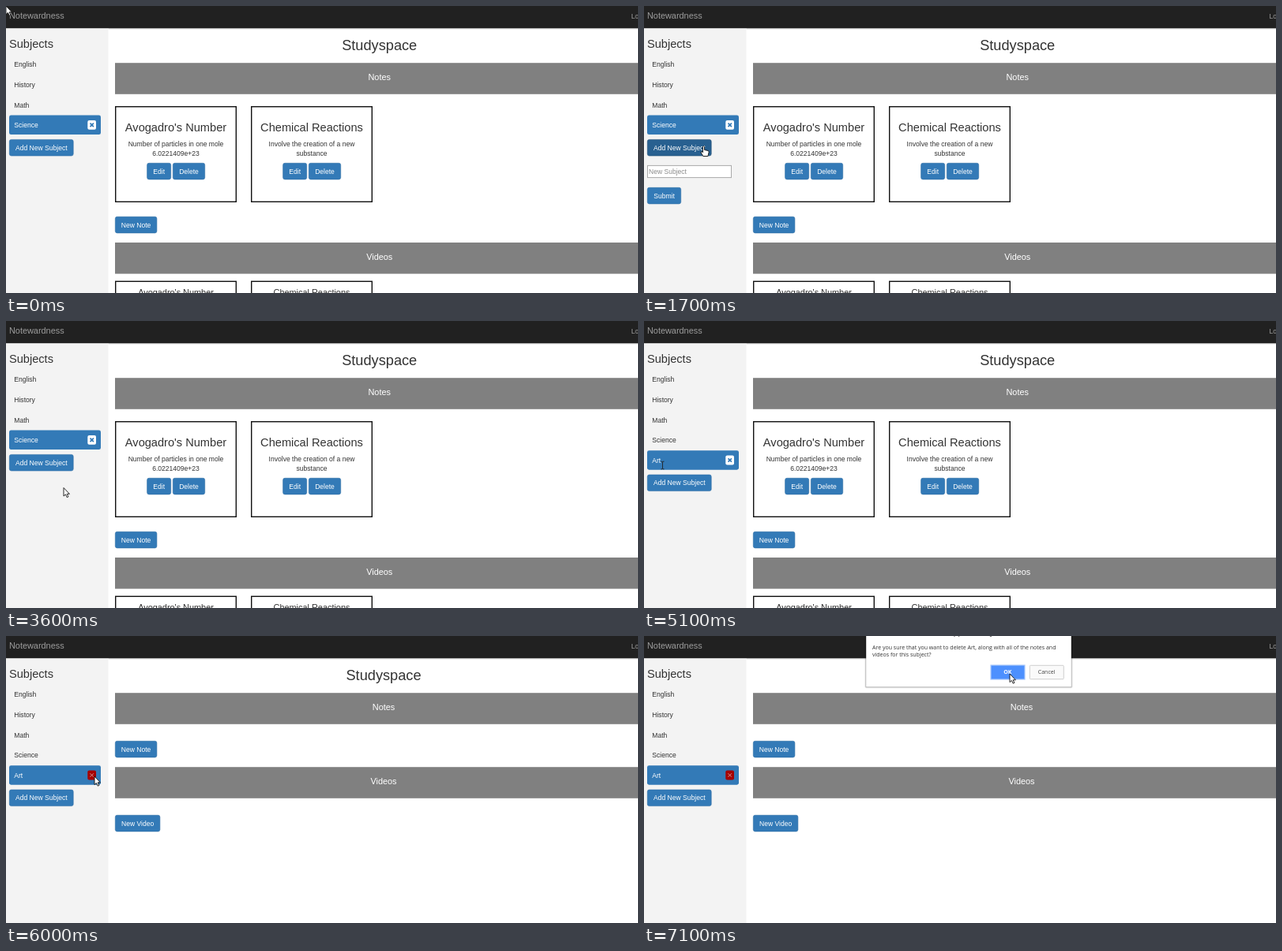
Animation, 800 px wide and 364 px high, one loop 7.2 s. Source, as an HTML page:

```html
<!DOCTYPE html>
<html lang="en">
<head>
<meta charset="utf-8">
<title>Studyspace</title>
<style>
html, body { margin: 0; width: 100%; height: 100%; overflow: hidden; background: #fff; }
svg { display: block; width: 100%; height: 100%; font: 8.55px "Liberation Sans", Arial, sans-serif; }
.dialog { font: 7.03px "Open Sans", "Noto Sans", sans-serif; }
</style>
</head>
<body>
<svg id="stage" viewBox="0 0 800 364"></svg>
<script>
const LOOP = 7200, STEP = 100, ROW = 25.6;
const stage = document.getElementById('stage');

// Pointer hot spot: time, x, y
const path = [
  [0, 0, 0], [800, 75.5, 177.5], [1700, 75.5, 177.5], [2300, 79, 218],
  [2800, 79, 218], [3000, 73, 211.5], [4400, 73, 211.5], [4900, 23.5, 183],
  [5200, 23.5, 183], [5800, 112, 178], [6200, 112, 178], [7000, 463, 48], [LOOP, 463, 48]
];

function pointerAt(t) {
  const i = path.findIndex(p => p[0] > t);
  const [t0, x0, y0] = path[i - 1], [t1, x1, y1] = path[i];
  const u = (t - t0) / (t1 - t0), e = u * u * (3 - 2 * u);
  return [x0 + (x1 - x0) * e, y0 + (y1 - y0) * e];
}

const rect = (x, y, w, h, fill, more = '') =>
  `<rect x="${x}" y="${y}" width="${w}" height="${h}" fill="${fill}" ${more}/>`;
const text = (s, x, y, fill = '#333', size = 8.55, more = '') =>
  `<text x="${x}" y="${y}" fill="${fill}" font-size="${size}" ${more}>${s}</text>`;
const mid = (s, x, y, fill, size, more = '') =>
  text(s, x, y, fill, size, 'text-anchor="middle" ' + more);
const button = (s, x, y, w, hover) =>
  rect(x + .3, y + .3, w - .6, 20.6, hover ? '#286090' : '#337ab7',
    `rx="2.4" stroke="${hover ? '#204d74' : '#2e6da4'}" stroke-width=".6"`) +
  mid(s, x + w / 2, y + 13.6, '#fff');
const bar = (s, x, y) => rect(138, y, 662, 39.6, '#808080') + mid(s, x, y + 21.5, '#fff', 10.9);
const frame = (x, y) =>
  rect(x + .7, y + .7, 152.6, 120.6, '#fff', 'stroke="#111" stroke-width="1.4"');

function note(x, title, line1, line2) {
  const c = x + 77;
  return frame(x, 127) + mid(title, c, 159.2, '#333', 14.6) +
    mid(line1, c, 177.6) + mid(line2, c, 189.8) +
    button('Edit', x + 40.3, 199, 30.7) + button('Delete', x + 73, 199, 41) +
    frame(x, 348.6) + mid(title, c, 367.3, '#333', 10.9);
}

function sidebar(t, hover) {
  const added = t >= 4000, red = t >= 5700;
  const names = ['English', 'History', 'Math', 'Science'];
  if (added) names.push('Art');
  const last = names.length - 1, y = 61.8 + last * ROW;
  let s = rect(0, 28, 129.5, 336, '#f3f3f3') + text('Subjects', 4, 53, '#333', 14.6);
  s += rect(4, y, 116, 24.5, '#337ab7', 'rx="2.4"');
  names.forEach((n, i) => s += text(n, 10.3, 77.4 + i * ROW, i === last ? '#fff' : '#333'));
  s += rect(103.3, y + 6.4, 10.7, 11.8, red ? '#a50000' : '#fff', 'rx="2"');
  s += `<path d="M106.5 ${y + 10.1}l4.4 4.4m0-4.4l-4.4 4.4" stroke="${red ? '#d59a9a' : '#337ab7'}" stroke-width="${red ? 1 : 1.7}"/>`;
  return s + button('Add New Subject', 4, y + 30.5, 81.5, hover);
}

function form(t) {
  const typed = 'Art'.slice(0, t < 2800 ? 0 : t < 3000 ? 1 : t < 3200 ? 2 : 3);
  const focus = t >= 2200;
  const caret = 6.2 + [0, 5.7, 8.6, 11][typed.length];
  return rect(4.5, 202.4, 106, 15.2, '#fff', `stroke="${focus ? '#5b9bea' : '#aaa'}"`) +
    text(typed || 'New Subject', 6, 213.2, typed ? '#333' : '#8c8c8c') +
    (focus ? rect(caret - .4, 205, .8, 10, '#222') : '') +
    button('Submit', 4, 230, 43);
}

function content(t) {
  const empty = t >= 5200, c = empty ? 478 : 472.7;
  const s = mid('Studyspace', c, 56.4, '#333', 18.2) + bar('Notes', c, 72.2);
  if (empty) return s + button('New Note', 138, 133, 53.2) + bar('Videos', c, 166.2) +
    button('New Video', 138, 227, 57.2);
  return s + note(138, "Avogadro's Number", 'Number of particles in one mole', '6.0221409e+23') +
    note(310, 'Chemical Reactions', 'Involve the creation of a new', 'substance') +
    button('New Note', 138, 267, 53.2) + bar('Videos', c, 300);
}

function dialog() {
  return '<g class="dialog">' +
    rect(279.5, -5, 263, 71.3, '#000', 'opacity=".1" rx="2"') +
    rect(280.5, -5, 261, 70.2, '#000', 'opacity=".25" rx="1"') +
    rect(281.2, -5, 259.6, 69.4, '#fff') +
    text('notewardness.herokuapp.com says:', 289, -1, '#222', 9.6) +
    text('Are you sure that you want to delete Art, along with all of the notes and', 289, 16.5, '#333', 7.03) +
    text('videos for this subject?', 289, 26, '#333', 7.03) +
    rect(439, 37, 43, 18, '#4d90fe', 'stroke="#a9c8fb" stroke-width="1.2"') +
    mid('OK', 460.3, 48.4, '#fff', 7.03, 'font-weight="700"') +
    rect(488.3, 37.3, 43, 17.4, '#fafafa', 'stroke="#c4c4c4" stroke-width=".8" rx="1"') +
    mid('Cancel', 509.6, 48.4, '#444', 7.03) + '</g>';
}

const cursors = {
  arrow: '<path d="M0 0V10.6L2.4 8.4L4.2 12.2L5.9 11.4L4.2 7.8H7.4Z" fill="#fff" stroke="#111" stroke-width=".9"/>',
  hand: '<path d="M-1 .8Q0-.6 1 .8V5L5.6 6Q6.8 6.3 6.6 8L5.4 13H-.6L-3.4 8.4Q-3.6 7-2.2 7.2L-1 8.3Z" fill="#fff" stroke="#111" stroke-width=".9"/>',
  beam: '<path d="M-2-4.8H-.5L0-4.3L.5-4.8H2M0-4.3V4.3M-2 4.8H-.5L0 4.3L.5 4.8H2" fill="none" stroke="#222" stroke-width=".9"/>'
};

function draw(t) {
  const [x, y] = pointerAt(t);
  const top = t >= 4000 ? 194.7 : 169;
  const hover = x > 4 && x < 85.5 && y > top && y < top + 21;
  const open = t >= 1300 && t < 3500;
  const onText = open && y > 201 || t >= 4800 && t < 5300;
  const shape = hover ? 'hand' : onText ? 'beam' : 'arrow';
  stage.innerHTML = rect(0, 0, 800, 364, '#fff') + rect(129.5, 28, 671, 1.4, '#d4d4d4') +
    content(t) + sidebar(t, hover) + (open ? form(t) : '') +
    rect(0, 0, 800, 28.2, '#212121') + text('Notewardness', 4, 16.4, '#9d9d9d', 10.9) +
    text('Log out', 791.5, 16, '#9d9d9d') +
    (t >= 6100 ? dialog() : '') +
    `<g transform="translate(${x} ${y})">${cursors[shape]}</g>`;
}

const start = performance.now();
let shown = -1;
function tick() {
  const t = Math.floor((performance.now() - start) % LOOP / STEP) * STEP;
  if (t !== shown) draw(shown = t);
  requestAnimationFrame(tick);
}
tick();
</script>
</body>
</html>
```
